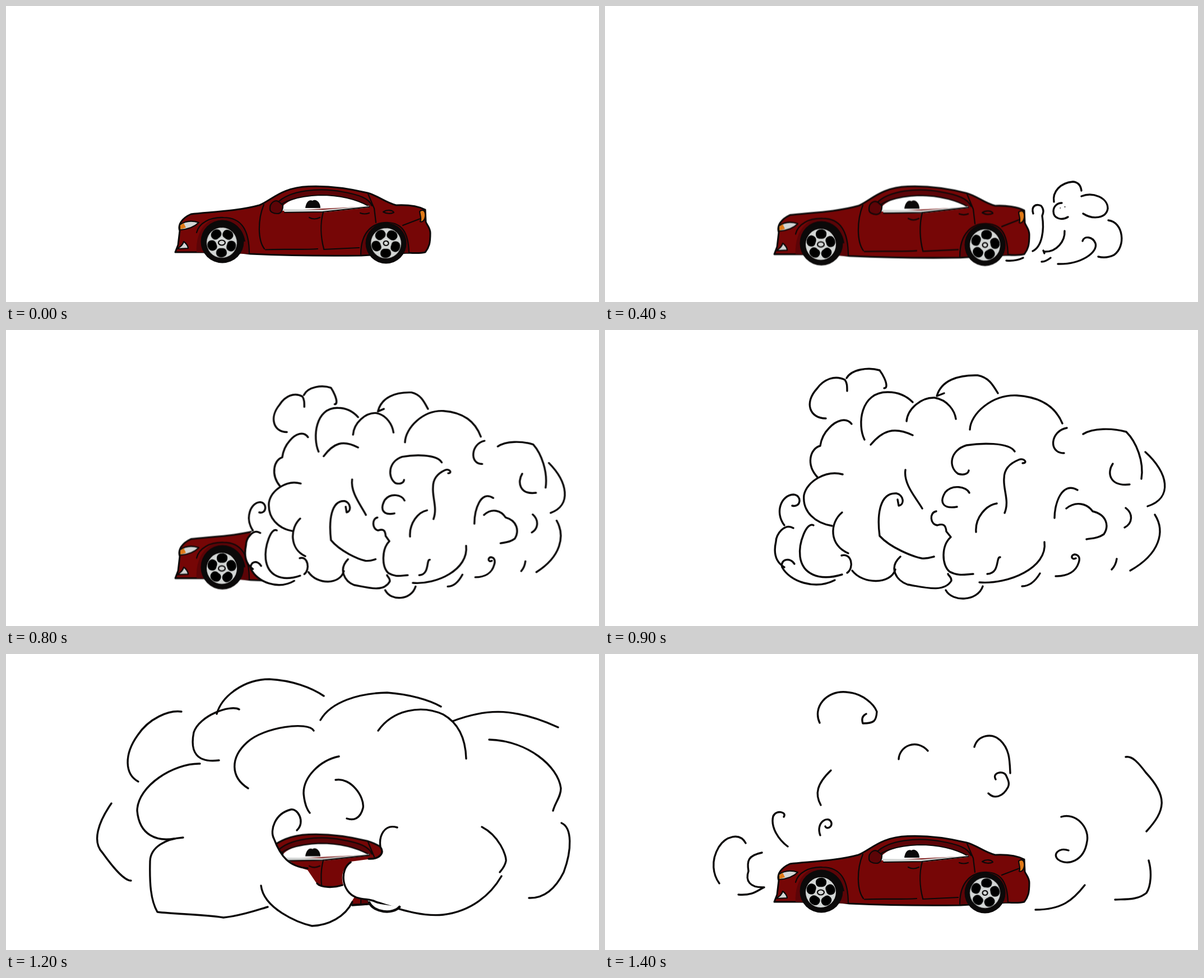
Recreate the animation shown at these times as an HTML page without scripts. Size 1058 px wide and 529 px high, loop 1.5 s.

```html
<!DOCTYPE html>
<html lang="en">
<head>
<meta charset="utf-8">
<title>Burnout</title>
<style>
html, body { margin: 0; width: 100%; height: 100%; overflow: hidden; background: #fff; }
svg { display: block; width: 100%; height: 100%; }
path, ellipse, circle { stroke-linecap: round; stroke-linejoin: round; }
.ink { fill: none; stroke: #0b0909; stroke-width: 2.2; }
.smoke { fill: none; stroke: #0b0909; stroke-width: 3.4; }
.smoke path { vector-effect: non-scaling-stroke; }
.cover { fill: #fff; stroke: none; }
.black { fill: #0b0909; }
.red { fill: #760606; }
.dark { fill: #5c0407; }
.grey { fill: #d3d6d5; }
.amber { fill: #e07a18; }
.edged { stroke: #0b0909; stroke-width: 2.2; }

/* each drawing is held for one fifteenth of the loop */
.f { opacity: 0; animation: show 1.5s step-end calc(var(--i) * .1s) infinite; }
@keyframes show { 0% { opacity: 1 } 6.66%, 100% { opacity: 0 } }

#car { transform-origin: 0 322px; animation: settle 1.5s step-end infinite; }
@keyframes settle {
  0% { transform: none }
  6.66% { transform: scaleY(1.015) }
  26.66% { transform: scaleY(1.03) }
  59.99% { opacity: 0 }
  79.99% { opacity: 1; transform: scaleY(1.015) }
  86.66%, 100% { opacity: 1; transform: translateY(3px) }
}
.front { animation: nudge 1.5s step-end infinite; }
@keyframes nudge { 0% { transform: rotate(36deg) } 6.66%, 100% { transform: rotate(0deg) } }
.rear { animation: spin 1.5s steps(15) infinite; }
@keyframes spin { from { transform: rotate(36deg) } to { transform: rotate(468deg) } }
</style>
</head>
<body>
<svg viewBox="0 0 1058 529">
<defs>
  <path id="hole" d="M-9-18C-9-28 8-29 10-20C11-12 5-9 0-10C-5-9-9-12-9-18Z"/>
  <g id="spokes">
    <circle r="27" class="grey"/>
    <use href="#hole"/>
    <use href="#hole" transform="rotate(72)"/>
    <use href="#hole" transform="rotate(144)"/>
    <use href="#hole" transform="rotate(216)"/>
    <use href="#hole" transform="rotate(288)"/>
  </g>

  <!-- first curls behind the tail -->
  <g id="curls" class="smoke">
    <path d="M801,350C798,332 812,316 835,314C845,315 849,322 850,330"/>
    <path d="M850,340C870,332 897,342 897,362C894,380 870,382 853,371"/>
    <path d="M898,383C925,386 930,430 908,445C898,450 888,450 880,448"/>
    <path d="M826,377C815,384 800,380 800,367C800,357 808,352 815,352"/>
    <path d="M764,371C760,358 768,353 778,357C784,364 782,370 780,375C784,400 780,430 763,438"/>
    <path d="M820,402C821,420 806,440 784,439M782,437l2,5"/>
    <path d="M852,420C855,410 870,412 875,424C880,440 850,462 808,461"/>
    <path d="M716,455C728,456 738,454 746,450M779,457C785,457 790,454 795,450"/>
    <path stroke-width="1.5" d="M812,361h.5M820,359h1"/>
  </g>

  <!-- plume over the rear half -->
  <g id="plume" class="smoke">
    <path class="cover" d="M692,301C668,305 652,325 655,350L661,402C676,398 692,402 704,407L706,468H960L985,400L972,250L900,180L780,200L692,240Z"/>
    <path d="M784,220C770,205 798,182 830,179"/>
    <path d="M826,205C845,175 890,170 920,187C965,212 985,262 961,324"/>
    <path d="M776,239C765,222 720,222 700,237C683,255 688,280 702,297C712,310 712,315 713,322"/>
    <path d="M692,301C670,305 655,325 655,350C658,370 658,385 660,400"/>
    <path d="M714,333C712,318 700,313 690,318C680,328 680,350 691,363"/>
    <path d="M753,273C743,285 748,299 769,299"/>
    <path d="M902,242C885,255 885,292 926,289"/>
    <path d="M847,290C838,270 820,268 808,282C800,295 800,310 803,340"/>
    <path d="M789,315C770,302 755,320 750,352"/>
    <path d="M808,325C815,310 850,312 857,323C858,330 850,330 858,332C880,335 892,352 889,365C885,378 865,378 854,376"/>
    <path d="M917,314C950,310 960,350 934,358"/>
    <path d="M817,358C800,358 803,382 825,380"/>
    <path d="M780,361C765,350 755,360 760,367C766,370 778,362 777,372C782,410 765,445 724,442"/>
    <path d="M971,347C1000,365 990,420 935,436"/>
    <path d="M845,412C845,400 825,402 829,412"/>
    <path d="M839,425C852,428 840,448 814,459"/>
    <path d="M862,417C885,425 865,450 831,457"/>
    <path d="M887,401C897,405 895,415 890,419"/>
    <path d="M902,391C925,400 920,435 891,442"/>
    <path d="M757,453C772,455 785,448 790,441"/>
    <path d="M664,398C660,388 675,378 687,388"/>
    <path d="M704,398C706,412 702,415 704,438"/>
  </g>

  <!-- cloud that swallows the car -->
  <g id="cloud" class="smoke">
    <path class="cover" d="M320,349C308,358 302,385 305,405L317,426C335,450 375,460 405,457L520,475H910L985,380L1000,270L900,180L650,85L480,75L380,110L360,240Z"/>
    <path d="M394,158C365,158 355,130 378,105C390,88 410,80 428,89C432,95 432,100 432,109"/>
    <path d="M431,86C440,70 470,66 490,72C496,80 502,92 502,99Q502,104 498,104"/>
    <path d="M463,196C450,170 455,110 505,111C525,111 540,120 549,129"/>
    <path d="M474,205C495,180 515,172 549,188"/>
    <path d="M440,168C430,155 412,162 400,175C387,188 385,200 384,207C366,212 358,240 379,263"/>
    <path d="M424,258C395,250 360,270 355,295C352,325 375,345 405,350"/>
    <path d="M538,163C540,140 565,120 588,121C612,125 624,145 626,159"/>
    <path d="M605,113L592,118C600,90 630,80 665,81C685,85 692,98 701,113"/>
    <path d="M651,178C652,150 690,115 735,117C780,120 805,140 816,167"/>
    <path d="M824,175C795,180 790,220 819,220"/>
    <path d="M853,186C870,175 905,175 930,182C948,200 962,235 957,266"/>
    <path d="M906,239C895,255 900,280 936,276"/>
    <path d="M964,218C1005,255 1014,300 968,315"/>
    <path d="M731,217C720,200 670,202 645,206C615,215 612,245 630,257C640,260 648,257 649,251"/>
    <path d="M745,238C755,238 748,228 738,232C718,240 712,252 712,265C710,285 722,305 713,327"/>
    <path d="M650,291C645,280 620,275 607,290C595,310 605,320 628,316"/>
    <path d="M536,250C532,275 555,300 566,319"/>
    <path d="M522,303L524,314C535,312 533,295 520,292C490,290 485,330 490,368C510,390 550,405 565,408C575,409 580,407 587,405"/>
    <path d="M699,310C680,313 660,335 662,361"/>
    <path d="M591,324C578,326 580,348 593,349C605,345 608,350 609,360L617,370C600,385 600,420 615,432C630,440 640,437 657,436"/>
    <path d="M423,326C400,345 400,385 434,399"/>
    <path d="M334,314C350,318 352,295 336,294C315,295 302,325 320,349"/>
    <path d="M336,354C320,345 305,365 305,378C300,400 305,415 320,424"/>
    <path d="M338,418C330,405 312,410 316,424C330,450 375,465 410,447"/>
    <path d="M372,349C360,342 345,380 348,405C352,435 380,450 423,437"/>
    <path d="M422,403C440,398 445,425 432,434"/>
    <path d="M441,430C460,455 510,455 518,428"/>
    <path d="M527,405C505,425 520,448 540,455C570,460 605,470 618,448C618,440 613,440 612,436"/>
    <path d="M608,465C620,487 665,485 674,458"/>
    <path d="M668,451C720,455 790,425 784,379"/>
    <path d="M705,406C697,405 705,435 682,436"/>
    <path d="M802,336C802,310 815,270 843,286"/>
    <path d="M823,319C840,305 860,310 870,324C895,330 900,350 890,365C880,372 870,372 859,374"/>
    <path d="M929,318C942,328 942,345 927,353"/>
    <path d="M981,330C1000,360 990,400 937,430"/>
    <path d="M840,408C832,412 830,402 838,401C846,402 848,408 845,416C840,432 825,440 804,440"/>
    <path d="M744,458C760,458 770,445 776,435M913,409C912,416 910,422 904,428"/>
  </g>

  <!-- widest cloud: rim and inside -->
  <g id="rim" class="smoke">
    <path d="M313,103C290,100 255,115 235,145C210,180 212,215 236,228"/>
    <path d="M376,107C385,75 425,45 470,45C510,47 545,60 567,75"/>
    <path d="M416,99C400,90 345,110 335,140C328,175 340,195 380,190"/>
    <path d="M561,118C580,85 630,70 680,69C720,72 755,82 776,94"/>
    <path d="M797,120C850,100 900,92 985,131"/>
    <path d="M862,153C930,155 985,200 990,240C990,255 980,265 976,280"/>
    <path d="M188,267C165,300 153,335 172,355C190,380 210,405 223,405"/>
    <path d="M991,302C1010,310 1010,350 995,390C980,420 960,437 933,436"/>
  </g>
  <g id="heart" class="smoke">
    <path d="M664,137C690,100 740,90 780,108C810,125 820,155 821,187"/>
    <path d="M549,137C540,120 460,130 430,158C400,185 400,220 432,240"/>
    <path d="M346,196C300,195 235,235 234,280C238,325 270,335 300,330"/>
    <path d="M316,328C285,330 258,345 257,370C256,410 258,440 270,461C300,465 350,465 388,471C420,468 450,457 467,452"/>
    <path d="M594,183C560,190 530,220 531,250C533,270 537,278 542,284"/>
    <path d="M588,225C615,220 640,255 637,275C632,295 620,298 608,294"/>
    <path d="M519,315C535,300 520,275 508,278C480,285 470,315 478,330C490,362 505,380 538,383"/>
    <path d="M455,414C460,455 520,480 546,486C575,485 605,470 618,443"/>
    <path d="M698,310C675,303 665,325 668,345C676,356 666,367 647,366"/>
    <path d="M615,372C595,385 598,425 625,435C640,440 650,437 660,443C700,455 740,470 780,466C830,460 865,430 884,397"/>
    <path d="M849,309C880,325 893,360 892,370C890,380 885,385 881,390"/>
  </g>

  <!-- last wisps -->
  <g id="wisps" class="smoke">
    <path d="M383,123C370,95 395,65 430,68C460,70 480,90 485,103C484,120 480,124 460,124C457,115 460,110 466,107"/>
    <path d="M524,188C525,165 555,150 576,173"/>
    <path d="M659,166C665,145 690,140 705,154C722,170 722,190 723,213"/>
    <path d="M697,224C690,212 710,208 715,216C720,226 722,232 719,238C710,255 695,260 684,249"/>
    <path d="M403,208C378,232 374,250 385,270"/>
    <path d="M319,291C325,282 305,278 300,290C295,310 310,332 326,344"/>
    <path d="M384,324C375,300 400,287 404,302C405,310 395,314 393,308"/>
    <path d="M251,338C240,318 215,326 203,345C188,370 193,395 204,410"/>
    <path d="M280,355C255,360 253,370 256,388C250,405 258,418 284,417C272,422 265,432 238,430"/>
    <path d="M929,184C940,182 950,192 965,212C1005,255 1000,280 966,317"/>
    <path d="M814,291C840,283 865,310 860,335C855,370 825,380 808,367C798,358 810,345 827,351"/>
    <path d="M970,369C976,390 974,415 966,427C950,440 930,438 910,439"/>
    <path d="M856,413C835,440 815,457 768,457"/>
  </g>
</defs>

<g id="car">
  <path class="red" stroke="#0b0909" stroke-width="3" d="M302,440L307,427L310,402C306,391 314,379 330,372C364,368 412,367 452,356C474,347 492,324 540,322.5C576,321 616,327 645,334C664,339 676,351 696,356C716,355 736,358 748,364L749,386C752,393 757,397 757,406C757,424 755,431 748,440C740,442 730,442 718,441L634,446C560,447 480,445 436,443L420,441L350,440Z"/>
  <path class="dark" d="M484,352C505,329 560,324 600,332C630,337 648,344 653,357L490,366Z"/>
  <path class="ink" d="M484,352C505,329 560,324 600,332C630,337 648,344 653,357"/>
  <path fill="#fff" d="M490,366C492,354 510,340 560,338C600,338 630,348 648,358Z"/>
  <path class="ink" d="M488,358C494,351 514,340 560,338C600,338 630,348 648,358"/>
  <path class="black" d="M534,361C535,352 540,345 547,348C552,344 561,350 561,361Z"/>
  <path class="grey" d="M494,363L565,364L648,357V360L565,369L497,368Z"/>
  <path class="ink" d="M497,369L565,368L648,359"/>
  <path class="dark edged" d="M471,363C470,352 480,345 487,350L494,356C494,366 490,371 484,371C477,371 471,368 471,363Z"/>

  <!-- door seams, handles, fuel cap -->
  <path class="ink" d="M460,355C449,382 449,418 461,434M463,435.500C490,434 530,436 556,434"/>
  <path class="ink" d="M566,368C560,390 562,415 567,434M567,435L630,432"/>
  <path class="ink" d="M646,336L657,362L660,387M541,378Q550,383 560,378M632,370Q640,373 648,370"/>
  <path class="ink" d="M673,368C680,363 690,365 692,369C686,372 678,371 673,368M708,392L742,379"/>

  <!-- wheel arches -->
  <path class="dark" d="M340,440C338,400 360,377 388,378C420,378 436,400 434,443Z"/>
  <path class="dark" d="M633,444C633,402 656,386 682,387C706,388 718,404 719,441Z"/>
  <path class="black" d="M351,415C354,372 420,372 427,421ZM645,420C648,382 706,382 714,420Z"/>
  <path class="ink" d="M340,405C344,388 364,377 388,378C420,378 434,400 434,443M633,444C633,402 656,386 682,387C706,388 718,404 719,441"/>

  <!-- lamps -->
  <path class="grey edged" d="M310,391C320,384 332,383 344,387C336,395 324,399 311,400Z"/>
  <path class="amber" d="M311,392L317,388L321,396L311,399Z"/>
  <path class="grey edged" d="M304,434C311,431 316,426 317,421C322,424 325,430 325,433Z"/>
  <path class="amber edged" d="M738,367C744,362 749,366 748,376C747,384 742,387 739,385C742,380 738,372 738,367Z"/>

  <g transform="translate(386 421)">
    <circle r="38.500" class="black"/>
    <g transform="translate(-1 2)">
      <g class="front"><use href="#spokes"/></g>
      <ellipse rx="6" ry="4.500" class="grey edged"/>
    </g>
  </g>
  <g transform="translate(678 424)">
    <circle r="36.500" class="black"/>
    <g class="rear"><use href="#spokes"/></g>
    <ellipse rx="4.500" ry="4" class="grey edged"/>
  </g>
</g>

<g class="f smoke" style="--i:2"><path stroke-width="2" d="M707,458h6M721,457h1M725,454L747,449M733,456L743,458M752,455L774,457"/></g>
<g class="f" style="--i:3"><use href="#curls" transform="translate(322 205) scale(.55)"/></g>
<g class="f" style="--i:4"><use href="#curls"/></g>
<g class="f" style="--i:5"><use href="#plume" transform="translate(148 23) scale(.85 .95)"/></g>
<g class="f" style="--i:6">
  <use href="#plume"/>
  <path fill="#fff" stroke="#0b0909" stroke-width="3" d="M646,437C654,470 702,472 706,430C696,456 664,458 646,437Z"/>
</g>
<g class="f" style="--i:7"><use href="#plume" transform="translate(-346 -46) scale(1.35 1.1)"/></g>
<g class="f" style="--i:8"><use href="#cloud" transform="translate(178 37) scale(.82 .92)"/></g>
<g class="f" style="--i:9"><use href="#cloud"/></g>
<g class="f" style="--i:10"><use href="#cloud" transform="translate(-34 -19) scale(1.05 1.04)"/></g>
<g class="f" style="--i:11" transform="translate(8 -14)"><use href="#rim"/><use href="#heart"/></g>
<g class="f" style="--i:12">
  <path class="cover" fill-rule="evenodd" d="M150,20H1040V490H150ZM479,334C510,312 600,310 667,340C676,356 666,367 645,367L615,371C598,385 598,400 602,414Q580,420 557,414L538,386C510,378 490,360 479,334ZM612,450L622,434L645,440L652,449Z"/>
  <use href="#rim"/><use href="#heart"/>
  <path class="smoke" d="M555,410C562,418 585,418 600,413M618,449L644,447"/>
  <path fill="#fff" stroke="#0b0909" stroke-width="4.500" d="M648,444C656,462 690,466 702,452"/>
</g>
<g class="f" style="--i:13"><use href="#rim" transform="translate(0 -20)"/></g>
<g class="f" style="--i:14"><use href="#wisps"/></g>
</svg>
</body>
</html>
```
